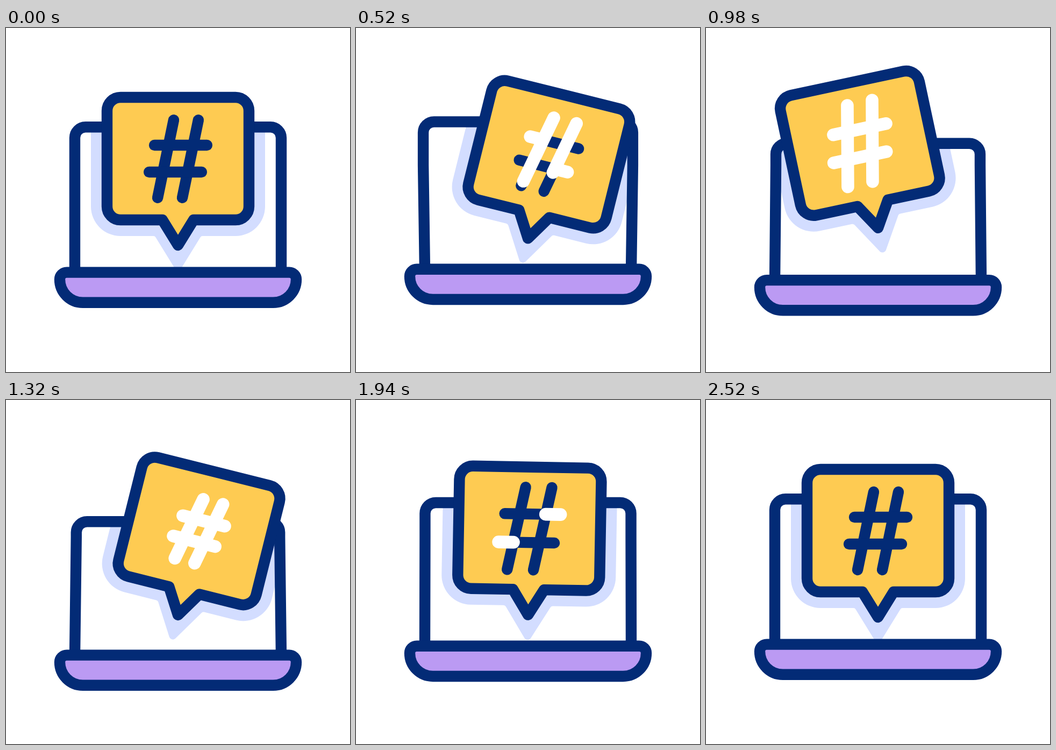
Write an HTML page with a canvas that moves like this. It is 640 px wide and 640 px high and loops after 2800 ms.

```html
<!DOCTYPE html>
<html lang="en">
<head>
<meta charset="utf-8">
<title>Hashtag post</title>
<style>
html, body { margin: 0; width: 100%; height: 100%; overflow: hidden; background: #fff; }
canvas { display: block; width: 640px; height: 640px; }
</style>
</head>
<body>
<canvas id="stage" width="640" height="640"></canvas>
<script>
const ctx = document.getElementById("stage").getContext("2d");
const LOOP = 2800, LINE = 20.4;
const NAVY = "#032b76", YELLOW = "#fecb52", PURPLE = "#bb9af3", SHADE = "#d3ddff", WHITE = "#fff";

// The turning points of the swing; every motion passes one pose per beat.
const BEATS = [0, 530, 990, 1330, 1720, 2080, 2420];

// Smooth curve through the poses, flat at every peak and dip.
function motion(...poses) {
  const slope = i => (poses[i + 1] - poses[i]) / (BEATS[i + 1] - BEATS[i]);
  const tangent = i => {
    if (i === 0 || i === poses.length - 1) return 0;
    const a = slope(i - 1), b = slope(i);
    return a * b > 0 ? 2 * a * b / (a + b) : 0;
  };
  return t => {
    const next = BEATS.findIndex(beat => beat > t);
    if (next < 0) return poses[poses.length - 1];
    const i = next - 1, d = BEATS[next] - BEATS[i];
    const s = (t - BEATS[i]) / d, q = 1 - s;
    return poses[i] * (1 + 2 * s) * q * q + poses[next] * s * s * (3 - 2 * s)
      + d * s * q * (tangent(i) * q - tangent(next) * s);
  };
}

const laptopDrop = motion(0, -5.8, 14.7, 20, 20, -5.2, 0);
const bubbleDrop = motion(0, -13, -32.2, -3.7, 3, -8, 0);
const bubbleAngle = motion(0, 14, -12.1, 14.1, -7, 5, 0);

// The hash pulses until it settles at full size.
function hashScale(t) {
  return t < 2018 ? 0.965 - 0.145 * Math.cos(2 * Math.PI * (t - 1300) / 1010) : 1;
}

function wipe(t, start) {
  const s = Math.min(1, Math.max(0, (t - start) / 320));
  return (1 - Math.cos(Math.PI * s)) / 2;
}

// Closed polygon with corners given as [x, y, radius].
function trace(corners) {
  const [a, b] = corners;
  ctx.beginPath();
  ctx.moveTo((a[0] + b[0]) / 2, (a[1] + b[1]) / 2);
  for (let i = 1; i <= corners.length; i++) {
    const [x, y, r] = corners[i % corners.length];
    const [nextX, nextY] = corners[(i + 1) % corners.length];
    ctx.arcTo(x, y, nextX, nextY, r);
  }
  ctx.closePath();
}

function fill(color) {
  ctx.fillStyle = color;
  ctx.fill();
}

function stroke(color, width = LINE) {
  ctx.strokeStyle = color;
  ctx.lineWidth = width;
  ctx.stroke();
}

// Speech bubble outline, symmetric around x = 320.
function traceBubble(half, top, bottom, radius, notch, notchRadius, tip, tipRadius) {
  const left = 320 - half, right = 320 + half;
  trace([
    [left, top, radius], [right, top, radius], [right, bottom, radius],
    [320 + notch, bottom, notchRadius], [320, tip, tipRadius], [320 - notch, bottom, notchRadius],
    [left, bottom, radius]
  ]);
}

// The bubble swings around its tip.
function placeBubble(t) {
  ctx.translate(320, 404 + bubbleDrop(t));
  ctx.rotate(bubbleAngle(t) * Math.PI / 180);
  ctx.translate(-320, -404);
}

function traceScreen(drop) {
  const top = 184.3 + drop * (drop > 0 ? 2.1 : 1.7);
  const inset = drop * (drop > 0 ? 0.14 : 0.5);
  const left = 128 + inset, right = 512 - inset;
  ctx.beginPath();
  ctx.moveTo(128, 455 + drop);
  ctx.lineTo(left, 255);
  ctx.arcTo(left, top, right, top, 20);
  ctx.arcTo(right, top, right, 255, 20);
  ctx.lineTo(right, 255);
  ctx.lineTo(512, 455 + drop);
}

function drawLaptop(t) {
  const drop = laptopDrop(t);
  ctx.save();
  traceScreen(drop);
  ctx.clip();
  placeBubble(t);
  traceBubble(162, 99, 387, 55, 43, 5, 457, 7);
  fill(SHADE);
  ctx.restore();

  traceScreen(drop);
  stroke(NAVY);

  const top = 454.6 + drop, bottom = 510.8 + drop;
  trace([[100, top, 13], [540, top, 13], [540, bottom, 43], [100, bottom, 43]]);
  fill(PURPLE);
  stroke(NAVY);
}

// Each bar: start point, end point, delay of its white stroke.
const bars = [
  [312, 171, 282, 316, 0],
  [358, 171, 328, 316, 60],
  [276, 218, 374, 218, 175],
  [364, 268, 266, 268, 175]
];

function drawBar([x0, y0, x1, y1], from, to, scale, color, width) {
  const at = f => [
    320 + (x0 + (x1 - x0) * f - 320) * scale,
    243.5 + (y0 + (y1 - y0) * f - 243.5) * scale
  ];
  ctx.beginPath();
  ctx.moveTo(...at(from));
  ctx.lineTo(...at(to));
  stroke(color, width);
}

function drawHash(t) {
  const scale = hashScale(t);
  for (const bar of bars) drawBar(bar, 0, 1, scale, NAVY, LINE);
  for (const bar of bars) {
    const delay = bar[4];
    const from = wipe(t, 1557 + delay), to = wipe(t, 254 + delay);
    if (to > from) drawBar(bar, from, to, scale, WHITE, 23.6);
  }
}

function draw(t) {
  ctx.fillStyle = WHITE;
  ctx.fillRect(0, 0, 640, 640);
  ctx.lineJoin = ctx.lineCap = "round";
  drawLaptop(t);
  ctx.save();
  placeBubble(t);
  traceBubble(132, 129, 357, 25, 29, 0, 404, 0);
  fill(YELLOW);
  stroke(NAVY);
  drawHash(t);
  ctx.restore();
}

const begin = performance.now();
function tick() {
  draw((performance.now() - begin) % LOOP);
  requestAnimationFrame(tick);
}
tick();
</script>
</body>
</html>
```
